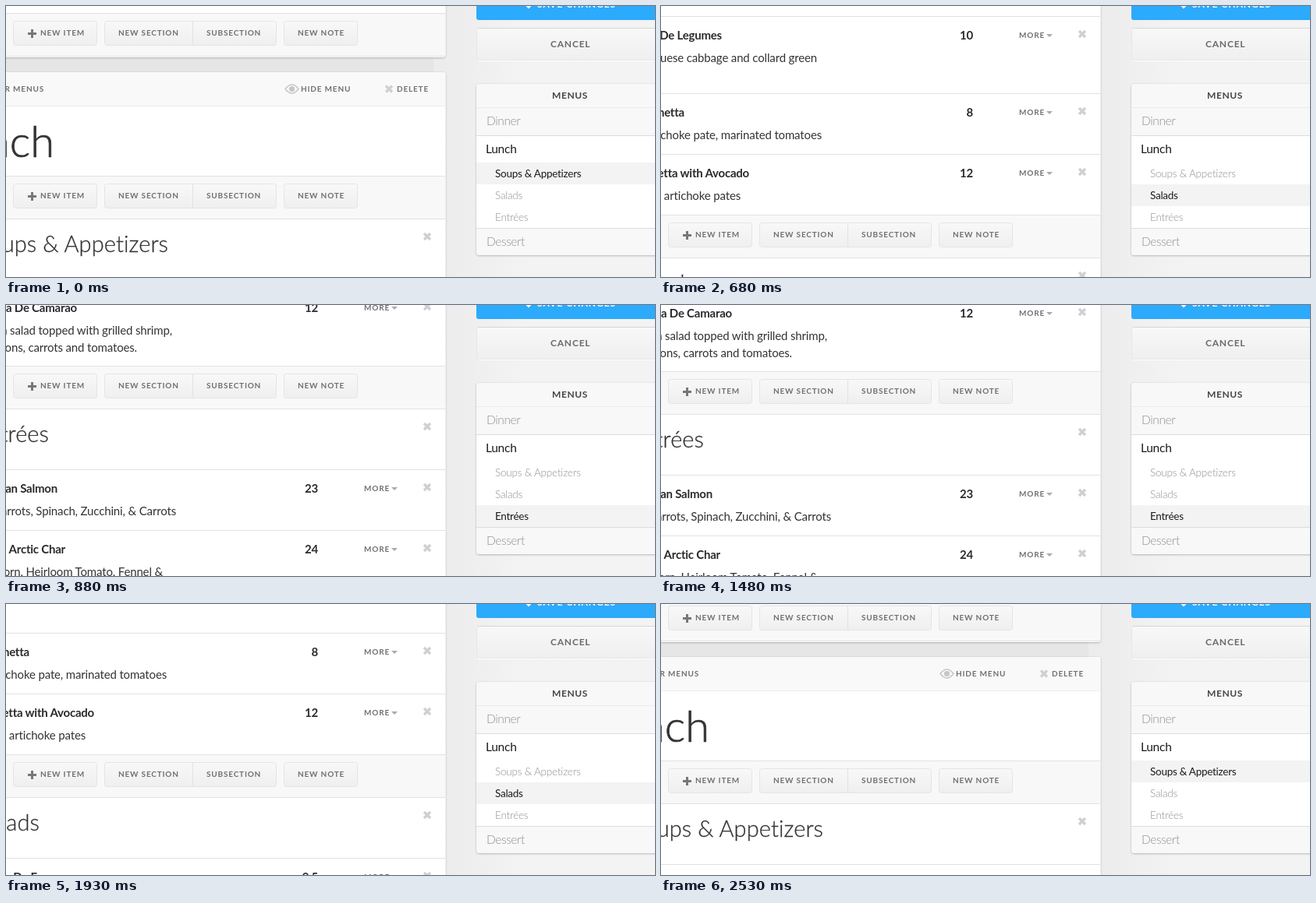
Animation of 832x348 px, one loop 2.58 s. Source, as an HTML page:

```html
<!DOCTYPE html>
<html lang="en">
<head>
<meta charset="utf-8">
<title>Menu editor</title>
<style>
  html, body { margin: 0; width: 100%; height: 100%; overflow: hidden; background: #f0f0f0; }
  svg { display: block; width: 832px; height: 348px; }
  text { font-family: Lato, "Open Sans", sans-serif; fill: #333; white-space: pre; }
  .end { text-anchor: end; }
  .huge { font-size: 56px; font-weight: 300; stroke: #333; stroke-width: .7px; }
  .head { font-size: 29px; font-weight: 300; letter-spacing: .1px; stroke: #333; stroke-width: .3px; }
  .name { font-size: 15px; font-weight: 700; letter-spacing: -.22px; fill: #2b2b2b; }
  .desc { font-size: 15px; letter-spacing: -.15px; }
  .caps { font-size: 10px; font-weight: 700; letter-spacing: .82px; fill: #707070; }
  .side { font-size: 12px; font-weight: 700; letter-spacing: .8px; fill: #6a6a6a; }
  .menu { font-size: 15.5px; letter-spacing: -.4px; fill: #8e8e8e; font-weight: 300; }
  .sub { font-size: 13.5px; letter-spacing: -.2px; fill: #8e8e8e; font-weight: 300; }
  .menu.on, .sub.on { letter-spacing: -.27px; fill: #1c1c1c; font-weight: 400; }
</style>
</head>
<body>
<svg id="stage" viewBox="0 0 832 348">
  <defs>
    <linearGradient id="page"><stop offset=".67" stop-color="#ececec"/><stop offset=".8" stop-color="#f3f3f3"/></linearGradient>
    <linearGradient id="button" x2="0" y2="1"><stop stop-color="#f8f8f8"/><stop offset="1" stop-color="#efefef"/></linearGradient>
    <filter id="shadow" x="-5%" y="-5%" width="110%" height="110%">
      <feDropShadow dx="0" dy=".7" stdDeviation="1.3" flood-opacity=".3"/>
    </filter>
  </defs>
  <rect width="832" height="348" fill="url(#page)"/>
  <g id="list"></g>
  <g id="sidebar"></g>
</svg>
<script>
const LOOP = 2580;
const list = document.getElementById('list');
const sidebar = document.getElementById('sidebar');
let layer = list;

function add(tag, attrs, content) {
  const el = document.createElementNS('http://www.w3.org/2000/svg', tag);
  for (const key in attrs) el.setAttribute(key, attrs[key]);
  if (content) el.textContent = content;
  return layer.appendChild(el);
}
const rect = (x, y, width, height, fill, more) => add('rect', { x, y, width, height, fill, ...more });
const path = (d, more) => add('path', { d, fill: 'none', ...more });
const text = (content, x, y, style) => add('text', { x, y, class: style }, content);
const rule = (y, color = '#e2e2e2') => rect(-10, y, 573, 1, color);
const cross = (x, y) => path(`M${x - 4} ${y - 4}l8 8m0-8l-8 8`, { stroke: '#d0d0d0', 'stroke-width': 3.4 });

function card(y, height) {
  rect(-10, y, 573.5, height, '#fff', { rx: 3, filter: 'url(#shadow)' });
}

function button(x, y, width) {
  rect(x + .5, y + .5, width - 1, 31, 'url(#button)', { rx: 3, stroke: '#e5e5e5' });
}

function toolbar(y) {
  rect(-10, y, 573, 55, '#f8f8f8');
  rule(y);
  rule(y + 55);
  button(9, y + 10, 108);
  button(126, y + 10, 221);
  button(356, y + 10, 95);
  rect(239, y + 10, 1, 32, '#e2e2e2');
  path(`M28 ${y + 26.5}h11m-5.5-5.5v11`, { stroke: '#777', 'stroke-width': 3 });
  const labels = { 'NEW ITEM': 44, 'NEW SECTION': 144, 'SUBSECTION': 257, 'NEW NOTE': 374 };
  for (const label in labels) text(label, labels[label], y + 29, 'caps');
}

function section(y, title, right) {
  text(title, right, y + 43, 'head end');
  cross(540, y + 23);
}

function item(y, name, right, price, lines) {
  rule(y);
  text(name, right, y + 30, 'name end');
  text(price, 400, y + 30, 'name end');
  text('MORE', 459, y + 28, 'caps');
  path(`M494 ${y + 23}h8l-4 4z`, { style: 'fill:#aaa' });
  cross(540, y + 23);
  lines.forEach(([line, end], i) => text(line, end, y + 59 + i * 22, 'desc end'));
}

// Scrolling list
rect(-10, 60, 558, 30, '#e6e6e6');
card(-60, 126);
toolbar(9);
card(85, 1400);
rect(-10, 85, 573, 43, '#f9f9f9', { rx: 3 });
rule(128, '#ececec');
text('REORDER MENUS', 49, 110, 'caps end');
path('M358 106.5q8.5-11 17 0q-8.5 11-17 0z', { stroke: '#c6c6c6', 'stroke-width': 1.5 });
add('circle', { cx: 366.5, cy: 106.5, r: 3.6, fill: '#c6c6c6' });
text('HIDE MENU', 378, 110, 'caps');
cross(491, 106.5);
text('DELETE', 501, 110, 'caps');
text('Lunch', 62, 194, 'huge end');

toolbar(218);
section(273, 'Soups & Appetizers', 208);
item(351, 'French Onion Soup!', 87, '15', [['One of our favorites!', 88]]);
item(429, 'Caldo De Legumes', 78, '10', [['Portuguese cabbage and collard green', 200]]);
item(528, 'Bruschetta', 30, '8', [['Artichoke pate, marinated tomatoes', 206]]);
item(606, 'Bruschetta with Avocado', 113, '12', [['Roast artichoke pates', 102]]);

toolbar(684);
section(739, 'Salads', 43);
item(817, 'Salada De Frango', 76, '9.5', [
  ['Green salad topped with grilled lemon-', 212],
  ['pepper chicken breast, cheese, tomatoes', 211],
  ['and topped with sesame seeds.', 154]]);
item(938, 'Salada De Camarao', 91, '12', [
  ['Green salad topped with grilled shrimp,', 213],
  ['onions, carrots and tomatoes.', 168]]);

toolbar(1037);
section(1092, 'Entrées', 55);
item(1170, 'Norwegian Salmon', 66, '23', [['Carrots, Spinach, Zucchini, & Carrots', 218]]);
item(1248, 'Wild Arctic Char', 76, '24', [['Corn, Heirloom Tomato, Fennel &', 201]]);

// Fixed sidebar
layer = sidebar;
rect(603, -20, 240, 38, '#2caafc', { rx: 3 });
path('M666 -2l4 4l5-5', { stroke: '#fff', 'stroke-width': 2 });
text('SAVE CHANGES', 681, 1.5, 'side').setAttribute('style', 'fill:#fff;letter-spacing:1px');
rect(603.5, 28.5, 240, 41, 'url(#button)', { rx: 3, stroke: '#e6e6e6' });
rect(605, 28, 240, 1, '#d6d6d6');
rect(605, 70, 240, 1, '#fff');
text('CANCEL', 698, 53, 'side');
rect(603, 100, 240, 220, '#f8f8f8', { rx: 4, filter: 'url(#shadow)' });
rect(603, 130, 240, 1, '#ebebeb');
rect(603, 166, 240, 120, '#dcdcdc');
rect(603, 167, 240, 118, '#fff');
text('MENUS', 700, 119, 'side').setAttribute('style', 'fill:#444;letter-spacing:.6px');
text('Dinner', 616, 153, 'menu');
text('Lunch', 615, 189, 'menu on');
text('Dessert', 616, 308, 'menu');
const band = rect(603, 201, 240, 28, '#f3f3f3');
const links = ['Soups & Appetizers', 'Salads', 'Entrées']
  .map((label, i) => text(label, 627, 220 + i * 28, 'sub'));

// Scroll keys: time, position, speed per ms
const down = [[500, 40, 2], [680, 416, 2.4], [880, 959, 0]];
const up = [[1430, 959, 0], [1680, 826, -.9], [2180, 181, -.7], [2530, 17, -.15], [2580, 0, 0]];

function follow(keys, t) {
  const i = keys.findIndex(key => t < key[0]);
  if (i < 0) return keys[keys.length - 1][1];
  const [t0, p0, v0] = keys[i - 1], [t1, p1, v1] = keys[i];
  const d = t1 - t0, u = (t - t0) / d, w = 1 - u;
  return w * w * ((1 + 2 * u) * p0 + u * d * v0) + u * u * ((1 + 2 * w) * p1 - w * d * v1);
}

function scrollAt(t) {
  if (t < 500) return 0;
  if (t < 1480) return follow(down, Math.floor(t / 20) * 20);
  return follow(up, Math.floor((t - 30) / 50) * 50 + 30);
}

function draw() {
  const y = Math.round(scrollAt(performance.now() % LOOP));
  list.setAttribute('transform', `translate(0 ${-y})`);
  const active = (y > 739 - 330) + (y > 1092 - 330);
  band.setAttribute('y', 201 + active * 28);
  links.forEach((link, i) => link.classList.toggle('on', i === active));
  requestAnimationFrame(draw);
}
draw();
</script>
</body>
</html>
```
